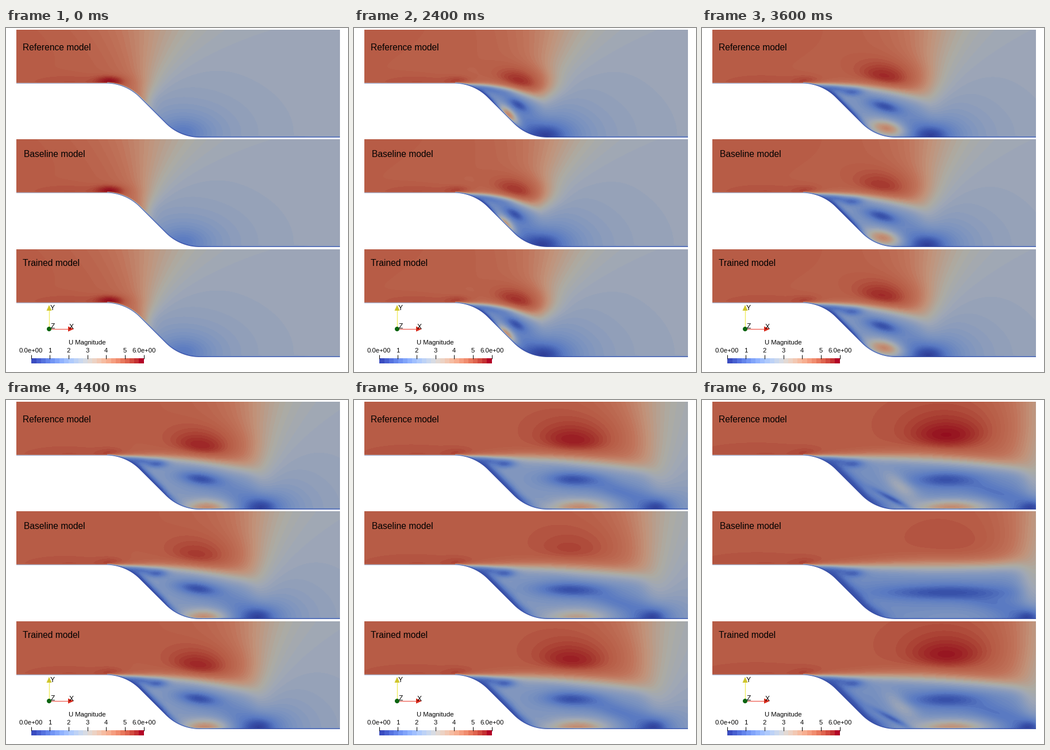
These frames come from a looping animation (595 by 600 pixels, 8000 ms). A matplotlib script:

```python
import numpy as np
import matplotlib.pyplot as plt
from matplotlib.animation import FuncAnimation
from matplotlib.colors import LinearSegmentedColormap
from matplotlib.patches import Circle, Polygon

W, H, DPI = 595, 600, 100
LEFT, RIGHT, DEPTH, STEP = 18, 581, 188, 93.5
RAMP_START, RAMP_END = 173.5, 337
FRAMES, INTERVAL = 20, 400

# Panel top, label, label x and baseline, weakening and lag of the vortex.
PANELS = [(3, "Reference model", 29, 39, 0, 0),
          (194, "Baseline model", 31, 225, 1, 6),
          (386, "Trained model", 29, 415, .1, 4)]


def wall(x):
    """Depth of the lower wall: flat, arc, 45 degree ramp, arc, flat."""
    r = (RAMP_END - RAMP_START - DEPTH + STEP) / (2 * np.sqrt(2) - 2)
    k = r * np.sqrt(.5)
    a = np.clip(x - RAMP_START, 0, k)
    b = np.clip(RAMP_END - x, 0, k)
    top = STEP + r - np.sqrt(r * r - a * a)
    ramp = STEP + r - k + (x - RAMP_START - k)
    low = DEPTH - r + np.sqrt(r * r - b * b)
    return np.where(x < RAMP_START + k, top,
                    np.where(x < RAMP_END - k, ramp, low))


xs = np.arange(LEFT, RIGHT) + .5
X, Y = np.meshgrid(xs, np.arange(DEPTH) + .5)
GAP = (wall(xs) - Y) / np.hypot(1, np.gradient(wall(xs)))
LAYER = np.exp(-(np.maximum(GAP, 0) / np.where(xs < 176, .8, 1.5)) ** 2)


def sigmoid(z):
    return 1 / (1 + np.exp(-np.clip(z, -40, 40)))


def ramp(i, start, end):
    return np.clip((i - start) / (end - start), 0, 1)


def smooth(u):
    return u * u * (3 - 2 * u)


def mix(f, value, weight):
    return f + weight * (value - f)


def blob(f, x, y, value, sx, sy, tilt=0, amount=1):
    c, s = np.cos(np.radians(tilt)), np.sin(np.radians(tilt))
    dx, dy = X - x, Y - y
    q = ((dx * c + dy * s) / sx) ** 2 + ((dy * c - dx * s) / sy) ** 2
    return mix(f, value, amount * np.exp(-q))


def speed(i, weak, lag):
    t = i / (FRAMES - 1)
    late = t ** 6
    lag = lag * ramp(i, 0, 6)

    # Everything is carried along by the front and the starting vortex.
    front = 243 + 322 * mix(t, smooth(t), .7) - lag
    vx = 223 + 10.6 * i - lag * (1 - late)
    vy = 136 - 28 * np.exp(-i / 3.5) + 6 * weak * late
    stag_x = front + 5 + 60 * np.exp(-i / 1.5)
    stag_y = wall(stag_x) - 2
    start = np.exp(-i / 2)

    # Fast inflow giving way to the slow outflow.
    up = np.clip(1 - Y / 125, 0, 1)
    centre = mix(front, 247 + 17 * i, up)
    width = mix(7 + .9 * i, 50 - i, up ** 1.2)
    outer = 2.7 + 2.35 * sigmoid((centre - X) / width)
    dist = np.hypot(X - stag_x, 1.6 * (Y - stag_y)) / (52 - 1.2 * i)
    slow = 1 - mix(.55, .95, ramp(i, 0, 5)) / (1 + dist ** 1.8)
    outer = outer * slow
    outer = blob(outer, 110, 92, 5.15, 70, 14)
    outer = blob(outer, 180, 90, mix(5.3, 5.95, start), 24, 9)

    # Jet squeezed over the vortex.
    peak = 5.42 + .027 * i - .8 * weak * t * t
    jet_y, jet_x, jet_h = 104 - 2.4 * i, 18 + 1.6 * i, 8 + .9 * i
    outer = blob(outer, vx, jet_y - jet_h / 2, mix(5.05, peak, .45),
                 1.7 * jet_x, 1.7 * jet_h, 18 * (1 - t), 1 - start)
    outer = blob(outer, vx, jet_y, peak, jet_x, .8 * jet_h,
                 22 * (1 - t), 1 - start)

    # Separated region below the shear layer.
    inner = (2.4 - 1.6 * np.exp(-(i / 5) ** 2) - .5 * late) * slow
    dx, dy = stag_x - vx, stag_y - vy
    inner = blob(inner, vx + dx / 2, vy + dy / 2 - 8, .9, abs(dx) / 2 + 8, 14,
                 np.degrees(np.arctan2(dy, dx)), .8 * ramp(i, 9, 16))
    core_x = (4 + 2.5 * i) * (1 + 1.1 * weak * late)
    core_y = 6 + .35 * i
    tilt = 55 * np.exp(-(i / 8) ** 2)
    inner = blob(inner, vx, vy, 1.4, 1.9 * core_x, 2.2 * core_y, tilt, .7)
    near = np.exp(-(GAP / (1 + .65 * i)) ** 2)
    inner = mix(inner, .5, near * sigmoid((262 + 3 * i - X) / 9))
    inner = blob(inner, 230, 101, .55, 36, 7, 8, .9 * ramp(i, 0, 6))
    inner = blob(inner, 262, 107, .6, 18, 8, 0, .9 * ramp(i, 4, 8))
    second = late * late * (1 - weak)
    inner = blob(inner, 345, 147, 2.8, 36, 15, 38, second)
    inner = blob(inner, 335, 172, .5, 42, 5, 28, .9 * second)
    turn = smooth(ramp(i, 5, 11))
    inner = blob(inner, vx - 20 + 30 * turn, min(186, 100 + 8 * i),
                 4 - 2 * weak * late, 2.5 + 3.2 * i, min(15, 1.5 * i + .5),
                 48 * (1 - turn))
    inner = blob(inner, vx, vy, .5, core_x, core_y, tilt, .95)

    # Shear layer: leaves the corner level, then bends down at the front.
    u = np.clip((xs - 180) / (front + 5 - 180), 0, 1)
    drop = (36 - .5 * i) * (1 - weak * late)
    shear = 95 + drop * u ** (2 + .08 * i)
    soft = np.clip(1.5 + (xs - 178) * .03, 1.5, 8)
    wake = sigmoid((Y - shear) / soft) * sigmoid((X - 180) / 3)
    wake = wake * sigmoid((front + 5 - X) / 10) * ramp(i, 0, 2)
    return mix(mix(outer, inner, wake), .5, LAYER)


def tones(*stops):
    return [(v / 6, tuple(c / 255 for c in rgb)) for v, rgb in stops]


FIELD = LinearSegmentedColormap.from_list("field", tones(
    (0, (45, 58, 148)), (.6, (58, 84, 172)), (1.2, (90, 122, 194)),
    (2, (126, 149, 191)), (2.7, (160, 168, 182)), (3.1, (173, 172, 163)),
    (3.8, (194, 146, 121)), (4.4, (192, 115, 90)), (5.05, (183, 91, 69)),
    (5.5, (165, 55, 46)), (6, (148, 14, 30))), N=56)

fig = plt.figure(figsize=(W / DPI, H / DPI), dpi=DPI, facecolor="white")
ax = fig.add_axes([0, 0, 1, 1])
ax.axis("off")


def label(x, y, s, px, ha="left"):
    ax.text(x, y, s, fontsize=px * 72 / DPI, family="Liberation Sans",
            color="black", ha=ha, va="baseline", zorder=5)


def line(x, y, color, width=1):
    ax.plot(x, y, color=color, lw=width * 72 / DPI, zorder=3,
            solid_capstyle="butt")


images = []
for top, name, tx, ty, weak, lag in PANELS:
    im = ax.imshow(speed(0, weak, lag), cmap=FIELD, vmin=0, vmax=6,
                   extent=(LEFT, RIGHT, top + DEPTH, top),
                   interpolation="nearest", aspect="auto")
    edge = np.arange(LEFT, RIGHT + 1)
    shape = [(LEFT, top), *zip(edge, top + wall(edge)), (RIGHT, top)]
    im.set_clip_path(Polygon(shape, transform=ax.transData))
    images.append((im, weak, lag))
    label(tx, ty, name, 15.6)

# Colour scale
ax.imshow(np.linspace(0, 1, 196)[None], cmap=plt.get_cmap("coolwarm", 24),
          extent=(44, 240, 585, 576), interpolation="nearest", aspect="auto")
label(141.5, 552, "U Magnitude", 11.4, "center")
for n in range(7):
    x = 43.5 + 32.7 * n
    line([x, x], [570, 577], "black")
    label(x, 566, f"{n}.0e+00" if n in (0, 6) else str(n), 11.2, "center")

# Orientation axes
line([75, 75], [525, 492], "#f0ee62", 1.4)
line([75, 109], [525, 525], "#f0685c", 1.4)
ax.add_patch(Polygon([(75, 483), (70.5, 493), (79.5, 493)],
                     fc="#cfc52c", ec="none", zorder=4))
ax.add_patch(Polygon([(118, 525), (108, 520.5), (108, 529.5)],
                     fc="#d82a1c", ec="none", zorder=4))
ax.add_patch(Circle((75, 525), 4, fc="#0b6410", ec="none", zorder=4))
label(80.5, 492, "Y", 12, "center")
label(81, 524, "Z", 12, "center")
label(114, 525, "X", 12, "center")

ax.set_xlim(0, W)
ax.set_ylim(H, 0)


def update(i):
    for im, weak, lag in images:
        im.set_data(speed(i, weak, lag))
    return [im for im, _, _ in images]


anim = FuncAnimation(fig, update, frames=FRAMES, interval=INTERVAL,
                     repeat=True, repeat_delay=0, blit=False)
plt.show()
```
